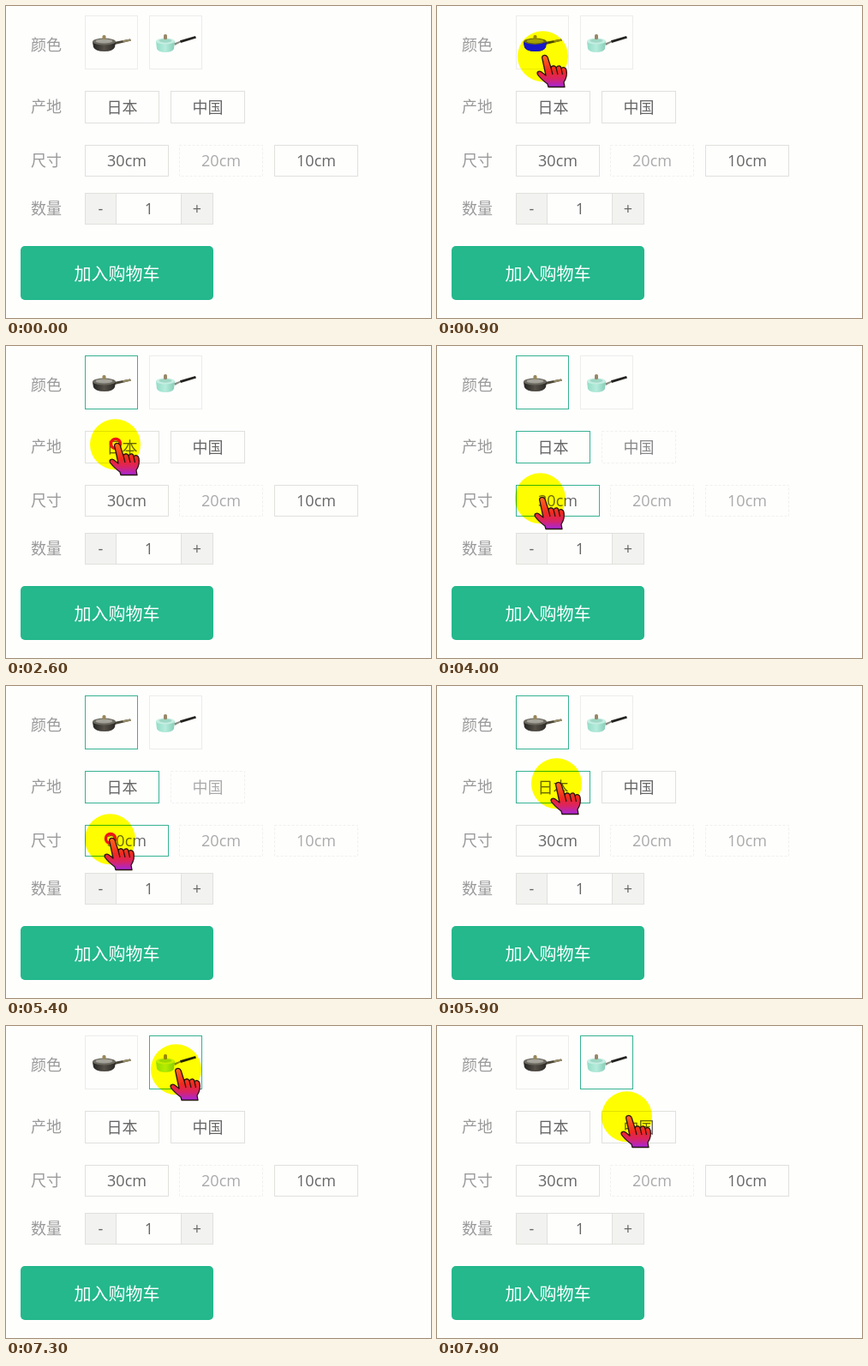
These frames come from a looping animation (496x364 px, 8000 ms). An HTML page:

```html
<!DOCTYPE html>
<html lang="zh-CN">
<head>
<meta charset="utf-8">
<title>商品规格选择</title>
<style>
  html, body { margin: 0; width: 100%; height: 100%; overflow: hidden; background: #fefefd; }
  svg { display: block; width: 496px; height: 364px; }
  text { font: 18px "Open Sans", "Noto Sans CJK SC", "Noto Sans CJK", sans-serif; fill: #666; text-anchor: middle; }
  .label { fill: #999; }
  .buy { font-size: 20px; fill: #fff; }
  .box { fill: none; stroke: #e0e0dc; }
  .pale { stroke: #ececea; }
  .off { stroke: #f0f0ee; stroke-dasharray: 3 2; }
  .on { stroke: #36b292; }
  .cell { fill: #f2f2f0; stroke: #e0e0dc; }
  .glow { fill: #ff0; mix-blend-mode: multiply; }
</style>
</head>
<body>
<svg viewBox="0 0 496 364">
  <defs>
    <linearGradient id="skin" x1="0" y1="0" x2="0" y2="1">
      <stop offset="0" stop-color="#ff6a1c"/>
      <stop offset=".5" stop-color="#f02820"/>
      <stop offset=".75" stop-color="#d82468"/>
      <stop offset="1" stop-color="#a526dc"/>
    </linearGradient>
    <linearGradient id="iron" x1="0" y1="0" x2="1" y2="0">
      <stop offset="0" stop-color="#222220"/>
      <stop offset=".5" stop-color="#555048"/>
      <stop offset="1" stop-color="#2a2824"/>
    </linearGradient>
    <linearGradient id="mint" x1="0" y1="0" x2="1" y2="0">
      <stop offset="0" stop-color="#94dcc6"/>
      <stop offset=".5" stop-color="#b6ecdc"/>
      <stop offset="1" stop-color="#86ccb6"/>
    </linearGradient>
  </defs>
  <rect width="496" height="364" fill="#fefefd"/>
  <g id="form"></g>

  <path d="M126 42 L145 38.5 L146 40.5 L127 45Z" fill="#4a4638"/>
  <path d="M136 40.2 L145 38.5 L146 40.5 L137 42.5Z" fill="#978c68"/>
  <path id="body" d="M101 42 H128 L127 48 Q125 53 115 53 Q104 53 102 48Z" fill="url(#iron)"/>
  <ellipse cx="114.5" cy="41.5" rx="13.5" ry="4" fill="#6c6a60"/>
  <ellipse cx="114.5" cy="41" rx="10" ry="2.6" fill="#a5a39a"/>
  <rect x="112.5" y="34" width="4" height="5" rx="1.5" fill="#98875a"/>

  <path d="M196 43.5 L204 40.5 L204.5 42 L197 46Z" fill="#8a8a80"/>
  <path d="M203 40.3 L221 35 L222 37.5 L204 43Z" fill="#23221f"/>
  <path d="M175 41 H197 L196 50 Q194 54 186 54 Q178 54 176 50Z" fill="url(#mint)"/>
  <ellipse cx="186" cy="41" rx="11" ry="3.6" fill="#c6eee2"/>
  <ellipse cx="186" cy="40.5" rx="7.5" ry="2.2" fill="#a0d8c6"/>
  <rect x="184" y="33" width="4" height="6" rx="1.5" fill="#988768"/>

  <g id="cursor">
    <circle cx="-.5" cy="-.3" r="29.5" class="glow"/>
  </g>
  <path id="tint" d="M101 42 Q114 48 128 42 L127 48 Q125 53 115 53 Q104 53 102 48Z" fill="#1818c8"/>
  <g id="hand">
    <circle id="ring" cy="-1" r="5.5" fill="none" stroke="#f01414" stroke-width="3.5"/>
    <path d="M0 -1 C2 -2.5 5 -1 5.5 2 L9 13 C10 10 14 10 15 13 C17 10 20.5 10 21 14 C23.5 11.5 26.5 13 27 16
             C28.5 23 26 27 24 30 L25 35.5 H6 L5 32 C1 29 -3 26 -6.5 21 C-8 18 -5 16 -2 18 L3 22 L-1 3
             C-2 1 -1 -1 0 -1Z" fill="url(#skin)" stroke="#2a1410" stroke-width="1.3" stroke-linejoin="round"/>
    <path d="M9 13 L11 21 M15 13 L17 21 M21 14 L22.5 21" stroke="#2a1410" stroke-width="1.2" fill="none"/>
  </g>
</svg>
<script>
  const LOOP = 8000, STEP = 100, FADE = 200;
  const DARK = 102, FAINT = 170;
  const $ = id => document.getElementById(id);

  function add(tag, attrs, text) {
    const el = document.createElementNS("http://www.w3.org/2000/svg", tag);
    for (const key in attrs) el.setAttribute(key, attrs[key]);
    if (text) el.textContent = text;
    return $("form").appendChild(el);
  }
  const write = (x, y, text, cls = "") => add("text", { x, y, class: cls }, text);
  const frame = (x, y, width, height, cls) =>
    add("rect", { x: x + .5, y: y + .5, width, height, class: cls });

  [["颜色", 52], ["产地", 124], ["尺寸", 187], ["数量", 243]].forEach(([s, y]) => write(47, y, s, "label"));

  // on / off: time spans in which an option is chosen or unavailable
  const options = [
    { x: 92, y: 11, w: 61, h: 62, base: "box pale", on: [1900, 7100] },
    { x: 167, y: 11, w: 61, h: 62, base: "box pale", on: [7100, LOOP] },
    { x: 92, y: 99, w: 86, h: 37, text: "日本", on: [2700, 6200] },
    { x: 192, y: 99, w: 86, h: 37, text: "中国", off: [3900, 5500] },
    { x: 92, y: 162, w: 97, h: 36, text: "30cm", on: [3900, 5500] },
    { x: 202, y: 162, w: 97, h: 36, text: "20cm", off: [-FADE, LOOP + FADE] },
    { x: 313, y: 162, w: 97, h: 36, text: "10cm", off: [2700, 6200] }
  ];
  for (const o of options) {
    o.base = o.base || "box";
    o.rect = frame(o.x, o.y, o.w, o.h, o.base);
    if (o.text) o.label = write(o.x + o.w / 2 + .5, o.y < 150 ? 125 : 187, o.text);
  }

  frame(92, 218, 149, 36, "box");
  frame(92, 218, 36, 36, "cell");
  frame(204, 218, 37, 36, "cell");
  write(110.5, 243, "-");
  write(167, 243, "1");
  write(223, 243, "+");
  add("rect", { x: 17, y: 280, width: 225, height: 63, rx: 5, fill: "#24b88c" });
  write(129.5, 319.5, "加入购物车", "buy");

  const path = [
    [200, 8, 112], [900, 124, 59], [1000, 126, 58], [1300, 128, 62], [1900, 128, 62],
    [2200, 148, 84], [2500, 128, 115], [2700, 128, 115], [3400, 121, 177], [3800, 121, 177],
    [4000, 121, 178], [4400, 122, 179], [5400, 122, 179], [5900, 140, 114], [6200, 138, 106],
    [6700, 137, 42], [7000, 193, 41], [7200, 195, 42], [7900, 222, 106], [LOOP, 222, 106]
  ];
  const presses = [1800, 2600, 3800, 5400, 6100, 7000];

  const within = (t, span) => !!span && t >= span[0] && t < span[1];
  const clamp = v => Math.max(0, Math.min(1, v));
  const show = (id, on) => { $(id).style.display = on ? "" : "none"; };

  function place(t) {
    const i = Math.max(1, path.findIndex(p => p[0] > t));
    const [a, b] = [path[i - 1], path[i]];
    const k = clamp((t - a[0]) / (b[0] - a[0]));
    return [1, 2].map(n => Math.round(a[n] + (b[n] - a[n]) * k));
  }

  function draw(t) {
    for (const o of options) {
      const state = within(t, o.on) ? " on" : within(t, o.off) ? " off" : "";
      o.rect.setAttribute("class", o.base + state);
      if (o.label && o.off) {
        const k = clamp((t - o.off[0]) / FADE) - clamp((t - o.off[1]) / FADE);
        const c = Math.round(DARK + (FAINT - DARK) * k);
        o.label.style.fill = `rgb(${c}, ${c}, ${c})`;
      }
    }
    const [x, y] = t < path[0][0] ? [-99, -99] : place(t);
    // The circle is moved by its centre: a transformed group would isolate its blending
    const glow = document.querySelector(".glow");
    glow.setAttribute("cx", x - .5);
    glow.setAttribute("cy", y - .3);
    $("hand").setAttribute("transform", `translate(${x} ${y})`);
    show("tint", Math.hypot(x - 115, y - 47) < 35);
    show("ring", presses.includes(t));
  }

  const start = performance.now();
  function tick() {
    const t = (performance.now() - start) % LOOP;
    draw(Math.floor(t / STEP) * STEP);
    requestAnimationFrame(tick);
  }
  tick();
</script>
</body>
</html>
```
